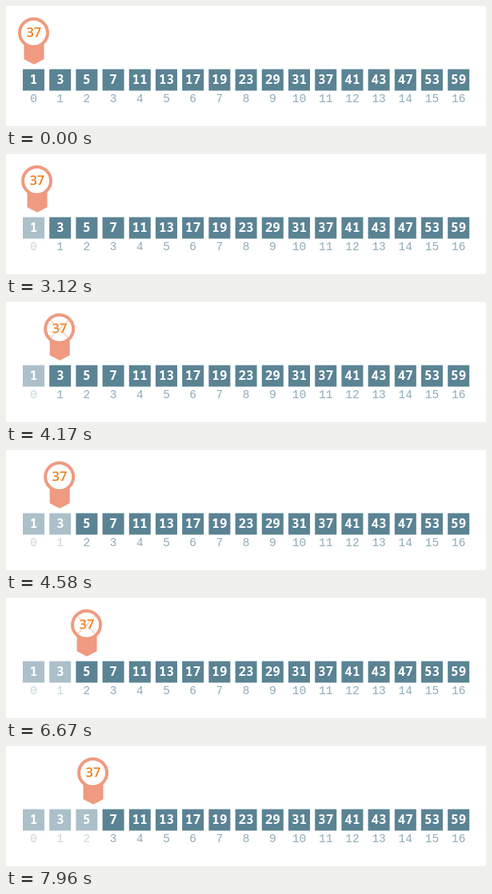
Write an HTML page that moves like this. It is 600 by 151 pixels and loops after 8000 ms.

```html
<!DOCTYPE html>
<html lang="en">
<head>
<meta charset="utf-8">
<title>Sequential search</title>
<style>
  html, body { margin: 0; width: 100%; height: 100%; overflow: hidden; background: #fff; }
  svg { display: block; width: 600px; height: 151px; }
  text { text-anchor: middle; font: 600 16px "Noto Sans Mono", monospace; }
  .cell rect { fill: #5a8394; }
  .cell text { fill: #fff; }
  .cell .index { fill: #8eabb8; font: 14.5px "Liberation Mono", monospace; }
  #pin .key { fill: #ee7f1b; font: 600 16.5px "Open Sans", sans-serif; }
</style>
</head>
<body>
<svg viewBox="0 0 600 151">
  <g id="cells"></g>
  <g id="pin">
    <path d="M-12 48H13V67L.5 73.5L-12 67Z" fill="#ef9a81"/>
    <circle cy="33.7" r="17.5" fill="#fff" stroke="#ef9a81" stroke-width="4"/>
    <text class="key" x=".3" y="39.3">37</text>
    <path id="cross" d="M-11.5 22.5L11.5 45.5M11.5 22.5L-11.5 45.5" stroke="#f3b184" fill="none"/>
  </g>
</svg>
<script>
const LOOP = 8000, PITCH = 33.2;
const values = [1, 3, 5, 7, 11, 13, 17, 19, 23, 29, 31, 37, 41, 43, 47, 53, 59];
const stops = [34.5, 66.7, 100.6, 133.8];
const checks = [[1250, 370], [4170, 410], [6670, 410]];  // start, duration
const moves = [[3080, 630], [5630, 580], [7880, 630]];

const pin = document.getElementById('pin');
const cross = document.getElementById('cross');
const cellLayer = document.getElementById('cells');
cellLayer.innerHTML = values.map((value, i) => `
  <g class="cell" transform="translate(${34.5 + PITCH * i})">
    <rect x="-13.5" y="79.5" width="27" height="27"/>
    <text y="98">${value}</text>
    <text class="index" y="121">${i}</text>
  </g>`).join('');
const cells = cellLayer.children;

const progress = (t, [start, duration]) =>
  Math.min(1, Math.max(0, (t - start) / duration));
const easeOut = p => 1 - (1 - p) ** 2;

function draw(t) {
  let x = stops[0], crossAlpha = 0;
  checks.forEach((check, i) => {
    const p = progress(t, check);
    cells[i].setAttribute('opacity', 1 - p / 2);
    if (t >= check[0]) crossAlpha = 1 - p;
    x += (stops[i + 1] - stops[i]) * easeOut(progress(t, moves[i]));
  });
  cross.setAttribute('opacity', crossAlpha);
  pin.setAttribute('transform', `translate(${x})`);
}

const begin = performance.now();
function tick() {
  draw((performance.now() - begin) % LOOP);
  requestAnimationFrame(tick);
}
tick();
</script>
</body>
</html>
```
